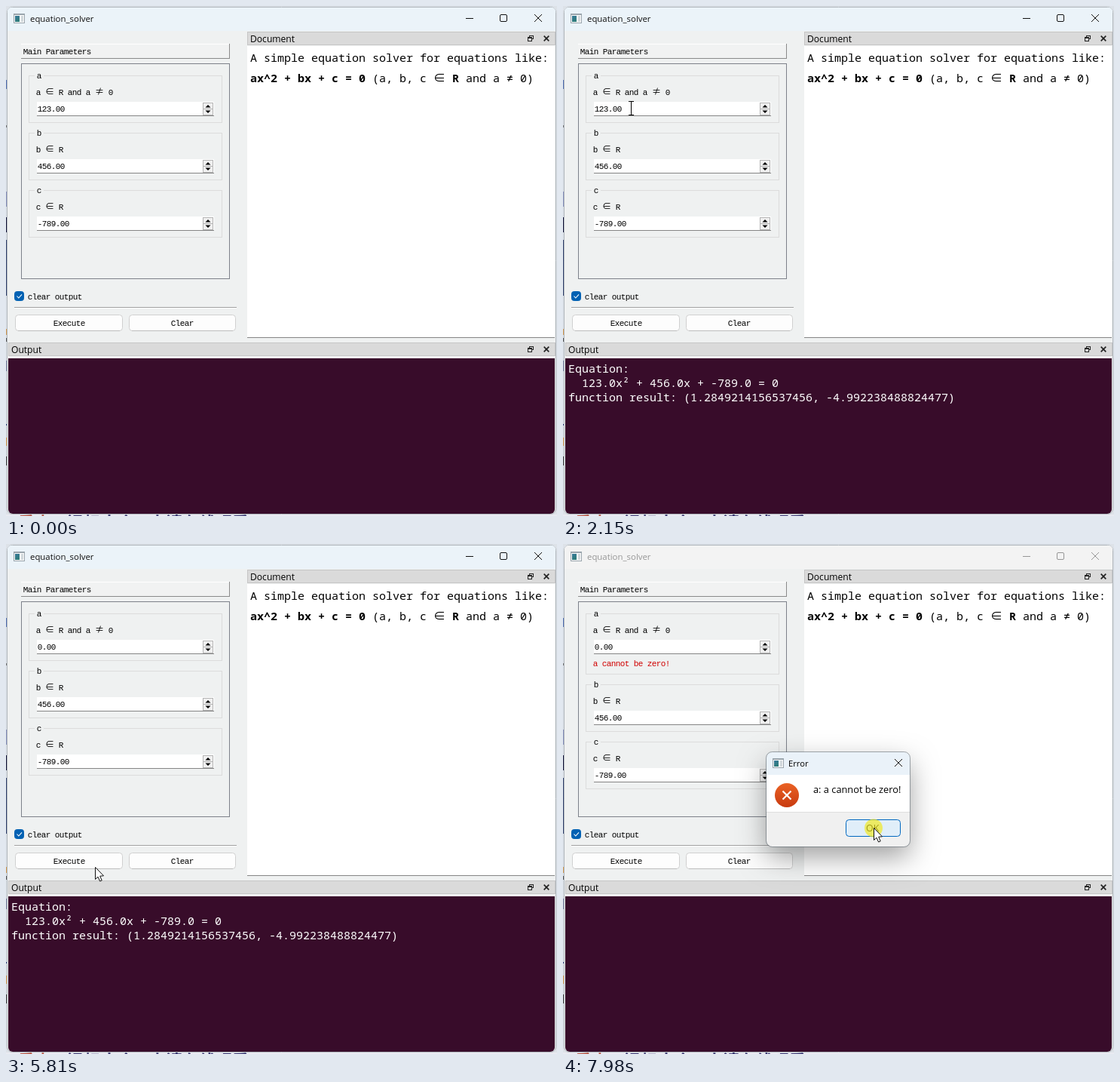
An HTML page with a canvas that plays this animation: 731x676 px, repeating every 8 s.

```html
<!DOCTYPE html>
<html lang="en">
<head>
<meta charset="utf-8">
<title>equation_solver</title>
<style>
html, body { margin: 0; width: 731px; height: 676px; overflow: hidden; }
canvas { display: block; }
</style>
</head>
<body>
<canvas id="stage" width="731" height="676"></canvas>
<script>
const c = document.getElementById('stage').getContext('2d');
const LOOP = 8000;
const SANS = '"Open Sans", "Noto Sans", sans-serif';
const MONO = '"Noto Sans Mono", "DejaVu Sans Mono", monospace';
const CJK = '"Noto Sans CJK SC", "Noto Sans CJK", sans-serif';
const BLUE = '#0067c0';

// Fixed-pitch text styles; the characters in "wide" take a full-width cell.
const FORM = { font: '11px "Liberation Mono", monospace', step: 6, wide: '∈≠', cell: 12 };
const DOC = { font: '15px ' + MONO, step: 9, wide: '∈', cell: 16 };
const BOLD = { ...DOC, font: 'bold 15px ' + MONO };

const RESULT = 'function result: (1.2849214156537456, -4.992238488824477)';
const OUTPUT = ['Equation:', '  123.0x² + 456.0x + -789.0 = 0', RESULT];

// Pointer track: time, x, y
const TRACK = [
  [140, 118, 425], [700, 531, 396], [820, 531, 377], [940, 531, 377],
  [1280, 137, 245], [1620, 129, 152], [1690, 129, 151], [2290, 84, 132],
  [2560, 84, 132], [2950, 5, 132], [3880, 5, 132], [4160, 70, 170],
  [4510, 128, 116], [4760, 128, 115], [5410, 117, 407], [5480, 117, 410],
  [5640, 118, 438], [5750, 118, 428], [5850, 118, 428], [6100, 113, 421],
  [6880, 113, 421], [7490, 405, 400], [7580, 407, 399], [7840, 412, 376]
];
const CLICKS = [[820, 940], [2560, 2900], [4650, 4760], [7900, LOOP]];

const within = (t, a, b) => t >= a && t < b;
const inBox = (p, x, y, w, h) => p && within(p.x, x, x + w) && within(p.y, y, y + h);

function pointer(t) {
  if (t < TRACK[0][0]) return null;
  const i = TRACK.findIndex(k => k[0] > t);
  if (i < 0) return { x: 412, y: 376 };
  const [t0, x0, y0] = TRACK[i - 1], [t1, x1, y1] = TRACK[i];
  const u = (t - t0) / (t1 - t0), e = u * u * (3 - 2 * u);
  return { x: x0 + (x1 - x0) * e, y: y0 + (y1 - y0) * e };
}

function rect(x, y, w, h, fill) {
  c.fillStyle = fill;
  c.fillRect(x, y, w, h);
}

function frame(x, y, w, h, color) {
  c.strokeStyle = color;
  c.lineWidth = 1;
  c.strokeRect(x + .5, y + .5, w - 1, h - 1);
}

function rounded(x, y, w, h, r, fill, stroke) {
  c.beginPath();
  c.roundRect(x + .5, y + .5, w - 1, h - 1, r);
  c.fillStyle = fill;
  c.fill();
  if (!stroke) return;
  c.strokeStyle = stroke;
  c.lineWidth = 1;
  c.stroke();
}

function poly(points, fill, stroke, width = 1, close = false) {
  c.beginPath();
  points.forEach(p => c.lineTo(...p));
  if (close) c.closePath();
  if (fill) { c.fillStyle = fill; c.fill(); }
  if (stroke) { c.strokeStyle = stroke; c.lineWidth = width; c.stroke(); }
}

function cross(x, y, r, color, width = 1) {
  poly([[x - r, y - r], [x + r, y + r]], null, color, width);
  poly([[x - r, y + r], [x + r, y - r]], null, color, width);
}

function label(s, x, y, size, color = '#000') {
  c.font = size + 'px ' + SANS;
  c.fillStyle = color;
  c.fillText(s, x, y);
}

function grid(s, x, y, style, color = '#000') {
  c.fillStyle = color;
  c.textAlign = 'center';
  for (const ch of s) {
    const wide = style.wide.includes(ch), w = wide ? style.cell : style.step;
    c.font = wide ? style.cell + 'px ' + CJK : style.font;
    c.fillText(ch, x + w / 2, y);
    x += w;
  }
  c.textAlign = 'left';
  return x;
}

function appIcon(x, y) {
  rect(x, y, 15, 13, '#9aa5ad');
  rect(x + 1, y + 2, 13, 10, '#fafafa');
  const g = c.createLinearGradient(x, y, x + 6, y + 11);
  g.addColorStop(0, '#3c78a8');
  g.addColorStop(1, '#2f7d78');
  rect(x + 2, y + 3, 6, 8, g);
  rect(x + 10, y + 3, 3, 8, '#d3d9dd');
}

function desktop() {
  rect(0, 0, 731, 676, '#dde2e8');
  rect(0, 674, 731, 2, '#e9eaf1');
  const marks = [[98, 12, '#5271b5'], [158, 3, '#777'], [246, 20, '#8790bd'], [280, 20, '#16163a'],
    [310, 74, '#33436f'], [428, 8, '#d69a50'], [440, 5, '#555'], [470, 14, '#8088a8'],
    [554, 2, '#384a88'], [572, 11, '#e0a257'], [597, 12, '#444']];
  for (const [y, h, color] of marks) rect(0, y, 2, h, color);
  c.font = 'bold 22px ' + CJK;
  c.fillStyle = '#b5523f';
  c.fillText('重点', 16, 693);
  c.fillStyle = '#34346f';
  c.fillText('视频', 80, 693);
  c.fillText('十会', 126, 693);
  c.fillText('直请在线观看', 190, 693);
}

function titleBar(active) {
  rounded(1, 1, 729, 673, 7, '#eff1f1', '#aeb5bb');
  c.save();
  c.clip();
  rect(2, 2, 727, 31, active ? '#ebf3f9' : '#f3f3f3');
  c.restore();
  const ink = active ? '#111' : '#969696';
  appIcon(10, 10);
  label('equation_solver', 32, 21, 11.4, ink);
  rect(610, 16, 10, 1, ink);
  c.strokeStyle = ink;
  c.lineWidth = 1;
  c.beginPath();
  c.roundRect(655.5, 11.5, 9, 9, 1.5);
  c.stroke();
  cross(706, 16, 5, ink);
}

function dock(title, x, y) {
  rect(x, y, 729 - x, 18, '#dadada');
  frame(x, y, 729 - x, 18, '#c6c6c6');
  label(title, x + 4, y + 14, 12.1);
  frame(694, y + 5, 6, 5, '#222');
  rect(692, y + 7, 6, 6, '#dadada');
  frame(692, y + 7, 6, 6, '#222');
  rect(692, y + 7, 6, 2, '#222');
  cross(717, y + 9, 3.3, '#222', 1.7);
}

function button(x, y, w, h, style = 'normal') {
  const [fill, edge] = {
    normal: ['#fdfdfd', '#d0d0d0'],
    focus: ['#fdfdfd', BLUE],
    hover: ['#e0eef9', BLUE],
    pressed: ['#cce4f7', '#005499']
  }[style];
  rounded(x, y, w, h, 4, fill, edge);
  if (style === 'normal') rect(x + 4, y + h - 1, w - 8, 1, '#bdbdbd');
}

function formButton(s, x, w, style) {
  button(x, 409, w, 22, style);
  grid(s, Math.round(x + w / 2 - s.length * 3), 424, FORM);
}

function spinner(y) {
  rect(261, y + 1, 14, 17, '#f0f0f0');
  frame(261, y + 1, 14, 9, '#b4b4b4');
  frame(261, y + 9, 14, 9, '#b4b4b4');
  poly([[264.5, y + 7.5], [268, y + 4], [271.5, y + 7.5]], '#000');
  poly([[264.5, y + 11.5], [268, y + 15], [271.5, y + 11.5]], '#000');
}

function group(name, hint, value, y, error, line = '#858585') {
  frame(30, y - 1, 257, error ? 81 : 63, '#dcdcdc');
  rect(38, y - 1, 12, 1, '#eff1f1');
  grid(name, 41, y + 3, FORM);
  grid(hint, 40, y + 25, FORM);
  rect(41, y + 34, 235, 19, '#fff');
  rect(41, y + 52, 235, 1, line);
  grid(value, 42, y + 47, FORM);
  spinner(y + 34);
  if (error) grid('a cannot be zero!', 40, y + 69, FORM, '#d00000');
}

function form(t, p, modal) {
  rect(20, 50, 277, 20, '#f1f2f2');
  rect(20, 50, 277, 1, '#fff');
  rect(20, 69, 277, 1, '#8a8a8a');
  rect(296, 50, 1, 20, '#8a8a8a');
  grid('Main Parameters', 23, 64, FORM);
  frame(20, 76, 277, 286, '#7d818a');

  const typed = within(t, 3910, 4690), error = t >= 6740, shift = error ? 18 : 0;
  const value = t < 3910 ? '123.00' : typed ? '0' : '0.00';
  const line = within(t, 2560, 3910) ? BLUE : typed ? '#63788c' : undefined;
  group('a', 'a ∈ R and a ≠ 0', value, 93, error, line);
  group('b', 'b ∈ R', '456.00', 169 + shift);
  group('c', 'c ∈ R', '-789.00', 245 + shift);

  if (within(t, 2560, 3910)) {
    const first = Math.max(0, Math.min(6, Math.round((p.x - 42) / 6)));
    const x = 42 + first * 6;
    rect(x, 130, 79 - x, 13, '#0078d4');
    grid(value.slice(first), x, 140, FORM, '#fff');
  }
  if (typed) rect(49, 130, 1, 13, '#000');

  rounded(11, 378, 13, 13, 3, '#0061b3', '#0061b3');
  poly([[14.5, 384.5], [16.8, 387], [21, 382.3]], null, '#fff', 1.1);
  grid('clear output', 29, 389, FORM);
  rect(11, 399, 295, 1, '#a0a0a0');
  rect(11, 400, 295, 1, '#fff');
  const hot = !modal && within(t, 5410, 6880) && inBox(p, 12, 409, 143, 19);
  const down = within(t, 6740, 6880);
  formButton('Execute', 12, 143, down ? 'pressed' : hot ? 'hover' : 'normal');
  formButton('Clear', 163, 142, 'normal');
}

function panels(hasOutput) {
  dock('Document', 320, 34);
  rect(320, 53, 408, 386, '#fff');
  rect(320, 439, 408, 1, '#858585');
  grid('A simple equation solver for equations like:', 324, 74, DOC);
  let x = grid('ax^2 + bx + c = 0', 324, 101, BOLD);
  x = grid(' (a, b, c ∈ ', x, 101, DOC);
  x = grid('R', x, 101, BOLD);
  grid(' and a ≠ 0)', x, 101, DOC);

  dock('Output', 3, 446);
  rect(3, 464, 726, 3, '#f4f5f5');
  c.beginPath();
  c.roundRect(3, 467, 725, 206, [0, 0, 6, 6]);
  c.fillStyle = '#380c2a';
  c.fill();
  if (hasOutput) OUTPUT.forEach((s, i) => grid(s, 7, 486 + i * 19, DOC, '#fff'));
}

function dialog(x, w, title, message, isError, p) {
  c.save();
  c.shadowColor = 'rgba(0,0,0,.38)';
  c.shadowBlur = 36;
  c.shadowOffsetY = 14;
  rounded(x, 276, w, 125, 8, '#fff');
  c.restore();
  c.save();
  c.beginPath();
  c.roundRect(x, 276, w, 125, 8);
  c.clip();
  rect(x, 276, w, 30, '#eaf2f9');
  rect(x, 306, w, 49, '#fff');
  rect(x, 355, w, 46, '#f0f0f0');
  rect(x, 355, w, 1, '#dfdfdf');
  c.restore();
  c.beginPath();
  c.roundRect(x - .5, 275.5, w + 1, 126, 8);
  c.strokeStyle = 'rgba(90,100,110,.55)';
  c.lineWidth = 1;
  c.stroke();

  appIcon(x + 8, 284);
  label(title, x + 29, 295, 11.2);
  cross(x + w - 15, 290, 5, '#111');
  const g = c.createLinearGradient(0, 317, 0, 349);
  g.addColorStop(0, isError ? '#ea6224' : '#2b8fe0');
  g.addColorStop(1, isError ? '#c83a10' : '#0a64b4');
  c.beginPath();
  c.arc(x + 27, 333, 16, 0, 7);
  c.fillStyle = g;
  c.fill();
  if (isError) cross(x + 27, 333, 5.5, '#fff', 2.2);
  else {
    rect(x + 26, 325, 2, 3, '#fff');
    rect(x + 26, 330, 2, 11, '#fff');
  }
  label(message, x + 62, 330, 12.8);
  const bx = x + w - 85;
  button(bx, 365, 73, 23, inBox(p, bx, 365, 73, 23) ? 'hover' : 'focus');
  label('OK', bx + 27, 381, 12.4);
}

function drawPointer(t, p, modal) {
  if (!p) return;
  if (CLICKS.some(([a, b]) => within(t, a, b))) {
    c.beginPath();
    c.arc(p.x, p.y + .5, 12, 0, 7);
    c.fillStyle = 'rgba(240,232,30,.68)';
    c.fill();
  }
  c.save();
  c.translate(Math.round(p.x), Math.round(p.y));
  const overField = !modal && t < 6740 && [127, 203, 279].some(y => inBox(p, 41, y, 219, 19));
  if (overField) {
    rect(0, -8, 1, 17, '#000');
    rect(-3, -9, 7, 1, '#000');
    rect(-3, 9, 7, 1, '#000');
  } else {
    poly([[.5, .5], [.5, 16.5], [4, 13.2], [6.6, 19], [9.2, 17.9], [6.7, 12.2], [11.5, 11.8]],
      '#fff', '#111', 1, true);
  }
  c.restore();
}

function draw(now) {
  const t = now % LOOP, p = pointer(t);
  const resultOpen = within(t, 140, 940), errorOpen = t >= 6880;
  const modal = resultOpen || errorOpen;
  desktop();
  titleBar(!modal);
  form(t, p, modal);
  panels(within(t, 70, 6740));
  if (resultOpen) dialog(150, 430, 'Result', RESULT, false, p);
  if (errorOpen) dialog(270, 190, 'Error', 'a: a cannot be zero!', true, p);
  drawPointer(t, p, modal);
}

const start = performance.now();
function tick() {
  draw(performance.now() - start);
  requestAnimationFrame(tick);
}
tick();
</script>
</body>
</html>
```
